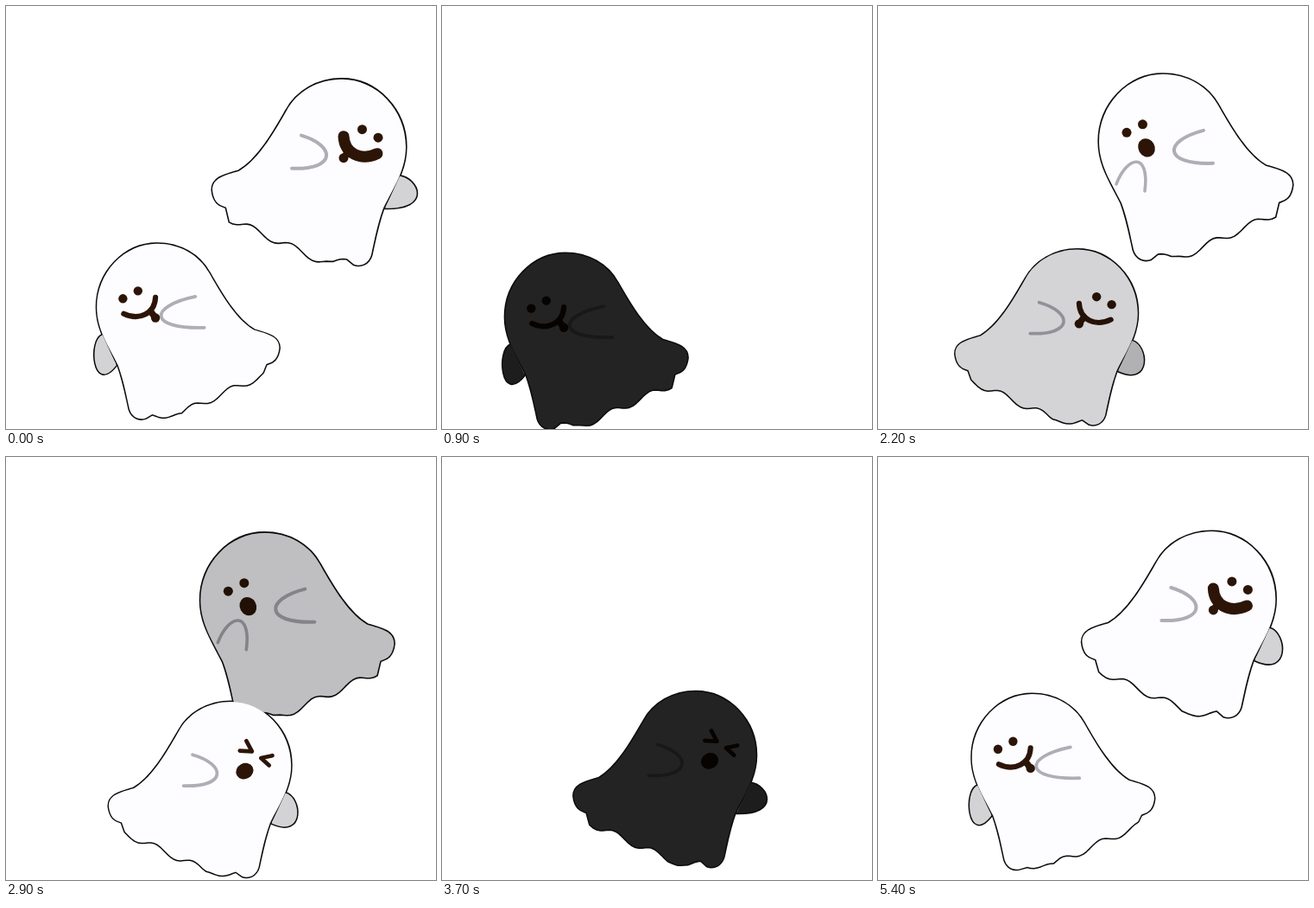
An HTML page with a canvas that plays this animation: 498x489 px, repeating every 5.5 s.

```html
<!DOCTYPE html>
<html lang="en">
<head>
<meta charset="utf-8">
<title>Two ghosts</title>
<style>
html, body { margin: 0; width: 100%; height: 100%; overflow: hidden; background: #fff; }
canvas { display: block; }
</style>
</head>
<body>
<canvas id="stage" width="498" height="489"></canvas>
<script>
const ctx = document.getElementById('stage').getContext('2d');
const LOOP = 5500, STEP = 100, FADE = 700, DARK = .137, TAU = Math.PI * 2;

const glide = (t, at, x, speed) => x + (t - at) * speed;
const bob = (t, mid, rise, lowest, period) => mid + rise * Math.cos(TAU * (t - lowest) / period);

// Each ghost appears at start, dims from dim on, then rests dark until end.
// x and y place the top of the head.
const ghosts = [
  { dir: -1, size: 1, elbow: -13, wave: .143, start: 1600, dim: 2700, end: 3500,
    x: t => glide(t, 2200, 330, -.0438),
    y: t => bob(t, 85.5, 7, 3300, 2000),
    face: () => 'gasp' },
  { dir: 1, size: 1, elbow: -18, wave: .857, start: 4500, dim: 5500, end: 6300, grin: 13,
    x: t => glide(t, 5500, 389, .0262),
    y: t => bob(t, 84, 6, 4850, 2800),
    droop: t => bob(t, .35, -.35, 5500, 333),
    face: t => t < 4700 ? 'blink' : 'smile' },
  { dir: 1, size: .943, elbow: -17, wave: .393, start: 1930, dim: 3000, end: 4500, grin: 6.5,
    x: t => glide(t, 2200, 231, .042),
    y: t => bob(t, 278, 7, 2600, 2400),
    droop: t => Math.min(.45, (3700 - t) / 1000),
    face: t => t < 2500 ? 'smile' : 'squint' },
  { dir: -1, size: .943, elbow: -5, wave: .157, start: 4830, dim: 5700, end: 7100, grin: 6.5,
    x: t => glide(t, 5500, 175, -.0356),
    y: t => bob(t, 280, 6, 6350, 2000),
    droop: () => .9,
    face: () => 'smile' },
];

// The hem is a staircase whose steps travel along it.
function bodyPath(phase) {
  let d = 'M-150 128C-150 114-136 111-119 106C-95 92-75 55-64 36C-52 14-28 0 0 0' +
    'C40 0 74 35 74 78C74 105 60 125 48 149C41 168 38 185 34 203C31 213 22 217 14 214';
  for (let x = 6; x >= -130; x -= 4) {
    const v = (x + 116) / 47, a = TAU * (v - phase);
    const y = Math.min(167 + 21.5 * (v - .2 * Math.sin(a)), 210 + 3 * Math.cos(a));
    d += `L${x} ${y}`;
  }
  return new Path2D(d + 'L-134 148C-138 146-148 146-150 128Z');
}

function farArmPath(d) {
  return new Path2D(`M67 112C${88 - 4 * d} ${115 + 3 * d} ${104 - 28 * d} ${150 + 40 * d} 50 149`);
}

function pose(g, now) {
  let t = now < g.start ? now + LOOP : now;
  if (t < g.start || t >= g.end) return null;
  t = Math.min(t, g.dim + FADE);
  const fadeIn = .5 + (t - g.start) / 800;
  const fadeOut = 1 - (1 - DARK) * (t - g.dim) / FADE;
  return { g, x: g.x(t), y: g.y(t), face: g.face(t), light: Math.min(1, fadeIn, fadeOut),
    body: bodyPath(g.wave - t / 700), farArm: g.droop && farArmPath(g.droop(t)) };
}

function place(p) {
  ctx.setTransform(p.g.dir * p.g.size, 0, 0, p.g.size, p.x, p.y);
}

function line(d, width) {
  ctx.lineWidth = width;
  ctx.stroke(new Path2D(d));
}

function dot(x, y, rx, ry = rx, turn = 0) {
  ctx.beginPath();
  ctx.ellipse(x, y, rx, ry, turn, 0, TAU);
  ctx.fill();
}

function outline(p) {
  place(p);
  ctx.strokeStyle = '#0b0b0b';
  ctx.lineWidth = 3.2;
  ctx.stroke(p.body);
  if (p.farArm) ctx.stroke(p.farArm);
}

function drawFace(kind, grin) {
  if (kind === 'blink') line('M16 55Q19 60 27 60M40 66Q43 71 50 71', 5);
  else if (kind === 'squint') line('M19 48L26 61L11 60M51 66L37 69L47 78', 5);
  else { dot(23.5, 58, 5.5); dot(42, 67.5, 5.5); }

  if (kind === 'gasp') dot(19, 85, 9.5, 11, .5);
  else if (kind === 'squint') dot(17, 85, 11, 9.5, -.5);
  else {
    line('M2 66C3 86 22 95 41 86', grin);
    line('M8 83L2 91', 8);
    dot(2, 91, 5.5);
  }
}

function paint(p) {
  place(p);
  const tone = (...rgb) => `rgb(${rgb.map(v => Math.round(v * p.light))})`;
  ctx.fillStyle = tone(253, 252, 255);
  ctx.fill(p.body);
  if (p.farArm) {
    ctx.fillStyle = tone(211, 210, 212);
    ctx.fill(p.farArm);
  }
  const c = (8 * p.g.elbow + 105) / 6;
  ctx.strokeStyle = tone(176, 173, 180);
  line(`M-47 65C${c} 77 ${c} 105-58 103`, 4);
  if (p.face === 'gasp') line('M54 127C41 93 15 90 21 135', 3.6);
  ctx.fillStyle = ctx.strokeStyle = tone(44, 21, 7);
  drawFace(p.face, p.g.grin);
}

function frame() {
  const now = Math.floor(performance.now() % LOOP / STEP) * STEP;
  ctx.setTransform(1, 0, 0, 1, 0, 0);
  ctx.clearRect(0, 0, 498, 489);
  ctx.lineCap = ctx.lineJoin = 'round';
  const shown = ghosts.map(g => pose(g, now)).filter(Boolean);
  shown.forEach(outline);
  shown.forEach(paint);
  requestAnimationFrame(frame);
}
frame();
</script>
</body>
</html>
```
